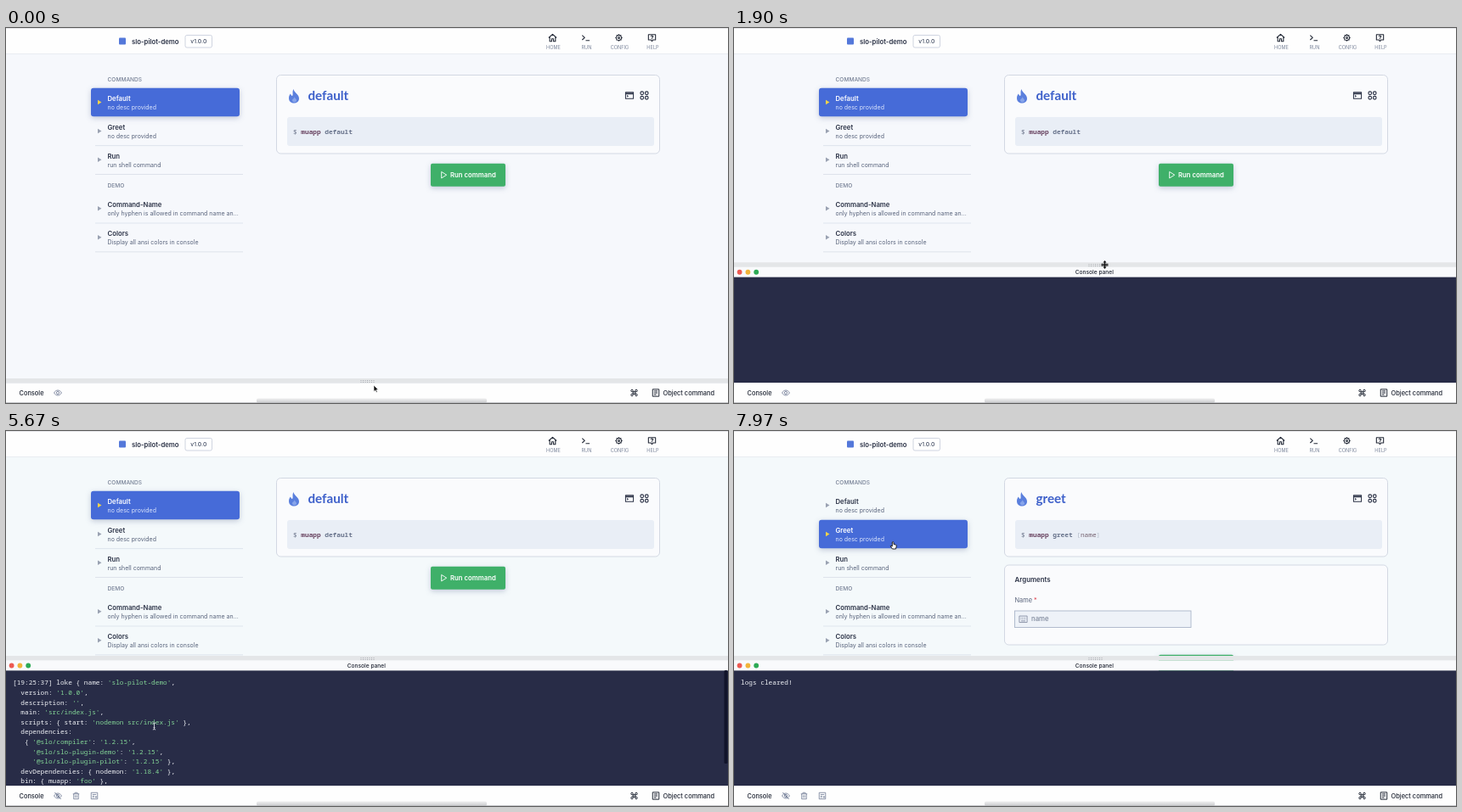
These frames come from a looping animation (850x442 px, 8 s). An HTML page:

```html
<!DOCTYPE html>
<html lang="en">
<head>
<meta charset="utf-8">
<title>Command runner</title>
<style>
html, body { margin: 0; width: 100%; height: 100%; overflow: hidden; background: #f5f8fb; }
svg { display: block; width: 850px; height: 442px; }
text { font-family: Inter, sans-serif; white-space: pre; }
.mono { font-family: "Noto Sans Mono", monospace; font-size: 7.77px; }
.lift { filter: drop-shadow(0 2px 3px rgba(40, 60, 110, .25)); }
</style>
</head>
<body>
<svg id="stage" viewBox="0 0 850 442"></svg>
<script>
const INK = '#2c3347', MUTED = '#59647c';
const stage = document.getElementById('stage');

// Markup helpers
const rect = (x, y, w, h, fill, extra = '') =>
  `<rect x="${x}" y="${y}" width="${w}" height="${h}" fill="${fill}" ${extra}/>`;
const text = (x, y, size, str, fill = INK, weight = 400, extra = '') =>
  `<text x="${x}" y="${y}" font-size="${size}" fill="${fill}" font-weight="${weight}" ${extra}>${str}</text>`;
const mono = (x, y, str, fill, weight = 400) =>
  `<text class="mono" x="${x}" y="${y}" fill="${fill}" font-weight="${weight}">${str}</text>`;
const group = (id, content) => `<g id="${id}">${content}</g>`;
// Icons live on a 24-unit grid centred on (x, y)
const icon = (x, y, size, path, color = INK, width = 2) =>
  `<path d="${path}" transform="translate(${x - size / 2} ${y - size / 2}) scale(${size / 24})"
    fill="none" stroke="${color}" stroke-width="${width}" stroke-linejoin="round"/>`;
const ring = (x, y, r) => `M${x - r} ${y}a${r} ${r} 0 1 0 ${2 * r} 0a${r} ${r} 0 1 0 ${-2 * r} 0`;

const gearTeeth = Array.from({ length: 8 }, (_, i) => {
  const a = i * Math.PI / 4, c = Math.cos(a), s = Math.sin(a);
  return `M${12 + 7 * c} ${12 + 7 * s}L${12 + 10 * c} ${12 + 10 * s}`;
}).join('');
const ICONS = {
  home: 'M1 12L12 2L23 12M4 10V22H9.5V15H14.5V22H20V10',
  terminal: 'M2 5L9 11.5L2 18M12 20H23',
  gear: ring(12, 12, 7.5) + ring(12, 12, 2.5) + gearTeeth,
  help: 'M2 3H22V18H15L12 22L9 18H2ZM9 8.5C9 5 15 5 15 8.5C15 10.5 12 10 12 12.5M12 14V16',
  window: 'M1 3H23V21H1ZM1 6H23M1 8H23M5 12L8 14L5 16',
  circles: [6, 18].map(x => [6, 18].map(y => ring(x, y, 4)).join('')).join(''),
  eye: 'M1 12C6 2 18 2 23 12C18 22 6 22 1 12Z' + ring(12, 12, 4),
  slash: 'M3 2L21 22',
  trash: 'M2 6H22M8 6V2H16V6M4.5 6V22H19.5V6M9.5 10V18M14.5 10V18',
  scroll: 'M2 2H22V22H2ZM6 8H18M6 13H12M6 17H11M17 12V18M14 15L17 18L20 15',
  command: 'M9 9V6A3 3 0 1 0 6 9H18A3 3 0 1 0 15 6V18A3 3 0 1 0 18 15H6A3 3 0 1 0 9 18Z',
  sheet: 'M3 2H21V22H3ZM7 7H17M7 12H17M7 17H13',
  keyboard: 'M1 3H23V21H1ZM5 8H7M9 8H11M13 8H15M17 8H19M5 12H7M9 12H11M13 12H15M17 12H19M6 17H18',
};

const ITEMS = [
  [0, 'Default', 'no desc provided'],
  [34, 'Greet', 'no desc provided'],
  [67.8, 'Run', 'run shell command'],
  [125.3, 'Command-Name', 'only hyphen is allowed in command name an...'],
  [159.2, 'Colors', 'Display all ansi colors in console'],
];
const LOG = `[19:25:37] loke { name: 'slo-pilot-demo',
  version: '1.0.0',
  description: '',
  main: 'src/index.js',
  scripts: { start: 'nodemon src/index.js' },
  dependencies:
   { '@slo/compiler': '1.2.15',
     '@slo/slo-plugin-demo': '1.2.15',
     '@slo/slo-plugin-pilot': '1.2.15' },
  devDependencies: { nodemon: '1.18.4' },
  bin: { muapp: 'foo' },`.split('\n');

const header = rect(0, 0, 850, 30.5, '#fefefe') + rect(0, 0, 850, 1, '#e4e5e8') + rect(0, 30, 850, 1, '#e9ecf1')
  + rect(133, 11.5, 8, 8, '#5478da', 'rx="1"')
  + text(148, 18.5, 7.75, 'slo-pilot-demo', INK, 600)
  + rect(211, 8.5, 31.5, 14.5, '#fff', 'rx="2" stroke="#c3cad8" stroke-width=".8"')
  + text(226.8, 18.3, 6.8, 'v1.0.0', '#465066', 500, 'text-anchor="middle"')
  + [['home', 'HOME', 644], ['terminal', 'RUN', 683], ['gear', 'CONFIG', 722], ['help', 'HELP', 761]]
    .map(([name, label, x]) => icon(x - .5, 11.5, 10, ICONS[name], '#222836', 2.6)
      + text(x + .5, 25.2, 5.6, label, '#7b859b', 400, 'text-anchor="middle"')).join('');

function sidebar(selected) {
  const entries = ITEMS.map(([dy, title, desc], i) => {
    const on = i === selected, y = 71 + dy;
    const line = on || i + 1 === selected ? '' : rect(105, y + 33.3, 174, .8, '#d8dee8');
    return (on ? rect(100, y - .3, 175, 33.5, '#466bd8', 'rx="3" class="lift"') : line)
      + `<path d="M108 ${y + 13.8}l4.5 2.7l-4.5 2.7z" fill="${on ? '#f0d24a' : '#9aa2b2'}"/>`
      + text(119.5, y + 14.7, 7.75, title, on ? '#fff' : INK, 600)
      + text(119.5, y + 25, 7, desc, on ? '#dbe4fb' : MUTED);
  }).join('');
  return text(119.5, 62.6, 6.6, 'COMMANDS', '#778196', 500) + text(119.5, 187.8, 6.6, 'DEMO', '#778196', 500) + entries;
}

const card = (y, h) => rect(318.5, y, 451, h, '#fafbfd', 'rx="5" stroke="#c9d0dc" stroke-width=".8"');
const runButton = y => rect(500, y, 88, 27, '#3fb069', 'rx="2" class="lift"')
  + icon(515.3, y + 13.5, 9, 'M5 2L21 12L5 22Z', '#fff', 2.4)
  + text(523, y + 16.3, 7.75, 'Run command', '#fff', 600);
const commandCard = (name, args) => card(55.5, 92.5)
  + `<path d="M338.5 72C339 76 345 78 345 83C345 87 342 88.500 339 88.500C335 88.500 333 86 333 82.500C333 80 334 78.500 335 77.500C335.500 79 336 80 337 80C338.500 79 336.500 75 338.500 72Z" fill="#5a7fdd"/>`
  + `<path d="M340 81C340 84 342.500 83 342 86C341.500 88 337 88 337 85.500C337 83.500 339 83.500 340 81Z" fill="#87a4ea"/>`
  + `<text x="355.500" y="84.800" style="font-family:Lato,sans-serif" font-size="15.200" font-weight="700" fill="#3c5fca">${name}</text>`
  + icon(734, 79.5, 10, ICONS.window, INK, 2.5) + icon(751.5, 79.5, 11, ICONS.circles, INK, 2.5)
  + rect(331, 105, 432, 34, '#e9eef6', 'rx="3"')
  + mono(338, 125, `<tspan fill="#858da0">$ </tspan><tspan fill="#6a4562">muapp</tspan> ${name}${args}`, '#66718a', 600);

const greetForm = card(158, 94)
  + text(330.5, 178.2, 7.9, 'Arguments', INK, 600)
  + text(330.5, 202.3, 7.4, 'Name <tspan fill="#df4652">*</tspan>', MUTED)
  + rect(330.5, 212, 207.5, 19.5, '#eef2f8', 'stroke="#aab5c9" stroke-width=".9"')
  + icon(340.5, 221.8, 10, ICONS.keyboard, '#7f899f')
  + text(350, 224.4, 7.8, 'name', '#7d879b', 500);

const PANEL_FLOOR = 418;
const grip = Array.from({ length: 7 }, (_, i) =>
  rect(417.5 + i * 2.5, 2, 1, 1, '#a4a7ad') + rect(417.5 + i * 2.5, 4, 1, 1, '#a4a7ad')).join('');
const panel = rect(0, 0, 850, 5.6, '#e4e6e8') + grip
  + rect(0, 5.6, 850, 11.8, '#f9fafc')
  + ['#ed5a52', '#f1b43a', '#2daa55'].map((c, i) => `<circle cx="${6.6 + i * 9.8}" cy="11.500" r="2.900" fill="${c}"/>`).join('')
  + text(424.3, 13.9, 6.65, 'Console panel', '#222734', 500, 'text-anchor="middle"')
  + rect(0, 17.4, 850, 420, '#282c47');

const logLines = LOG.map((line, i) => mono(8, 299.3 + i * 11.61,
  line.replace(/'[^']*'/g, s => `<tspan fill="#83d596">${s}</tspan>`), '#f1f3f7')).join('')
  + rect(845.5, 282, 4, 110, '#11142a', 'rx="1.500"');

const footer = rect(0, PANEL_FLOOR, 850, 24, '#fefefe') + rect(0, PANEL_FLOOR, 850, .7, '#e1e4e9')
  + text(15.5, 433, 7.4, 'Console', '#1f2533', 500)
  + icon(61, 430, 9.5, ICONS.eye, '#66728e')
  + group('tools', icon(61, 430, 9.5, ICONS.slash, '#66728e', 2.4)
    + icon(82.5, 430, 9, ICONS.trash, '#66728e') + icon(104, 430, 9, ICONS.scroll, '#66728e'))
  + icon(739.5, 430, 10, ICONS.command, '#222836', 2.4) + icon(765, 430, 10, ICONS.sheet, '#222836', 2.4)
  + text(773.5, 433, 7.45, 'Object command', '#1f2533', 500)
  + rect(295, 436.5, 271, 5.5, 'url(#dock)', 'rx="2"') + rect(0, 441.2, 850, .8, '#b9bbc0');

const pointers =
  group('arrow', '<path d="M0 0V7.500L1.800 6L3 8.600L4.200 8L3 5.500H5.300Z" fill="#111" stroke="#fff" stroke-width=".600"/>')
  + group('hand', '<path d="M-1.200 -3.500Q0 -4.500 .500 -3.300V-1L3 -.400Q4 0 3.700 1.500L3 4.500H-1L-3.300 1.200Q-2.800 .200 -1.200 1.400Z" fill="#fff" stroke="#111" stroke-width=".900"/>')
  + group('resize', '<path d="M-4 -.700H4M-4 .900H4M0 -4V4" stroke="#111" stroke-width="1.200"/><path d="M-2 -2.500L0 -5L2 -2.500ZM-2 2.500L0 5L2 2.500Z" fill="#111"/>')
  + group('beam', '<path d="M-1.600 -4Q0 -4 0 -3V3Q0 4 -1.600 4M1.600 -4Q0 -4 0 -3M0 3Q0 4 1.600 4M-1 1.500H1" fill="none" stroke="#d9dce4" stroke-width=".900"/>');

stage.innerHTML = `<defs>
  <clipPath id="above"><rect width="850" height="${PANEL_FLOOR}"/></clipPath>
  <linearGradient id="dock" x2="0" y2="1"><stop stop-color="#f0f0f1"/><stop offset="1" stop-color="#c9cacc"/></linearGradient>
</defs>`
  + rect(0, 0, 850, 442, '#f5f8fb', 'id="backdrop"')
  + group('defaultPage', sidebar(0) + commandCard('default', '') + runButton(159.7))
  + group('greetPage', sidebar(1)
    + commandCard('greet', ' <tspan fill="#c3cad6">[</tspan><tspan font-weight="400" fill="#74616f">name</tspan><tspan fill="#c3cad6">]</tspan>')
    + greetForm + runButton(263.7))
  + header
  + `<g clip-path="url(#above)">${group('panel', panel)}${group('log', logLines)}${group('cleared', mono(8, 299.3, 'logs cleared!', '#f1f3f7'))}</g>`
  + footer + group('pointer', pointers);

// Keyframes: [time, ...values]
const PANEL_TOP = [[0, 413], [1120, 413], [1600, 333.3], [1900, 276.3], [2150, 265]];
const POINTER = [
  [0, 433, 421], [600, 430, 416], [1050, 430, 416], [1600, 428.5, 328], [1900, 436.5, 279],
  [2150, 436, 268], [2450, 436, 268], [3150, 538.5, 181.5], [3900, 538.5, 181.5], [4900, 174.5, 348],
  [5800, 174.5, 348], [6300, 82, 430], [6550, 82, 430], [7170, 170, 193.5], [7560, 187.5, 134.5],
];
const SHAPES = [[0, 'arrow'], [550, 'resize'], [2500, 'arrow'], [3050, 'hand'], [4020, 'arrow'], [4450, 'beam'],
  [6180, 'arrow'], [6270, 'hand'], [6590, 'arrow'], [6650, 'beam'], [6980, 'arrow'], [7250, 'hand']];
const RELEASE = 2200, RUN = 3800, CLEAR = 6450, OPEN_GREET = 7750;

const ease = u => u * u * (3 - 2 * u);
function sample(keys, t, curve) {
  const next = keys.findIndex(k => k[0] > t);
  if (next < 0) return keys.at(-1).slice(1);
  const a = keys[next - 1], b = keys[next], u = curve((t - a[0]) / (b[0] - a[0]));
  return a.slice(1).map((v, i) => v + (b[i + 1] - v) * u);
}
const byId = id => document.getElementById(id);
const show = (id, on) => byId(id).setAttribute('display', on ? 'inline' : 'none');

function draw(now) {
  const t = now % 8000;
  const dragging = t > 1050 && t < 2150;
  const [top] = sample(PANEL_TOP, t, u => u);
  const [x, y] = sample(POINTER, t, dragging ? u => u : ease);
  const shape = SHAPES.findLast(s => s[0] <= t)[1];
  byId('panel').setAttribute('transform', `translate(0 ${top})`);
  byId('pointer').setAttribute('transform', `translate(${x} ${y})`);
  for (const name of ['arrow', 'hand', 'resize', 'beam']) show(name, name === shape);
  byId('backdrop').setAttribute('fill', t < RELEASE ? '#f6f8fc' : '#f4f9fb');
  show('tools', t >= RELEASE);
  show('log', t >= RUN && t < CLEAR);
  show('cleared', t >= CLEAR);
  show('defaultPage', t < OPEN_GREET);
  show('greetPage', t >= OPEN_GREET);
  requestAnimationFrame(draw);
}
requestAnimationFrame(draw);
</script>
</body>
</html>
```
